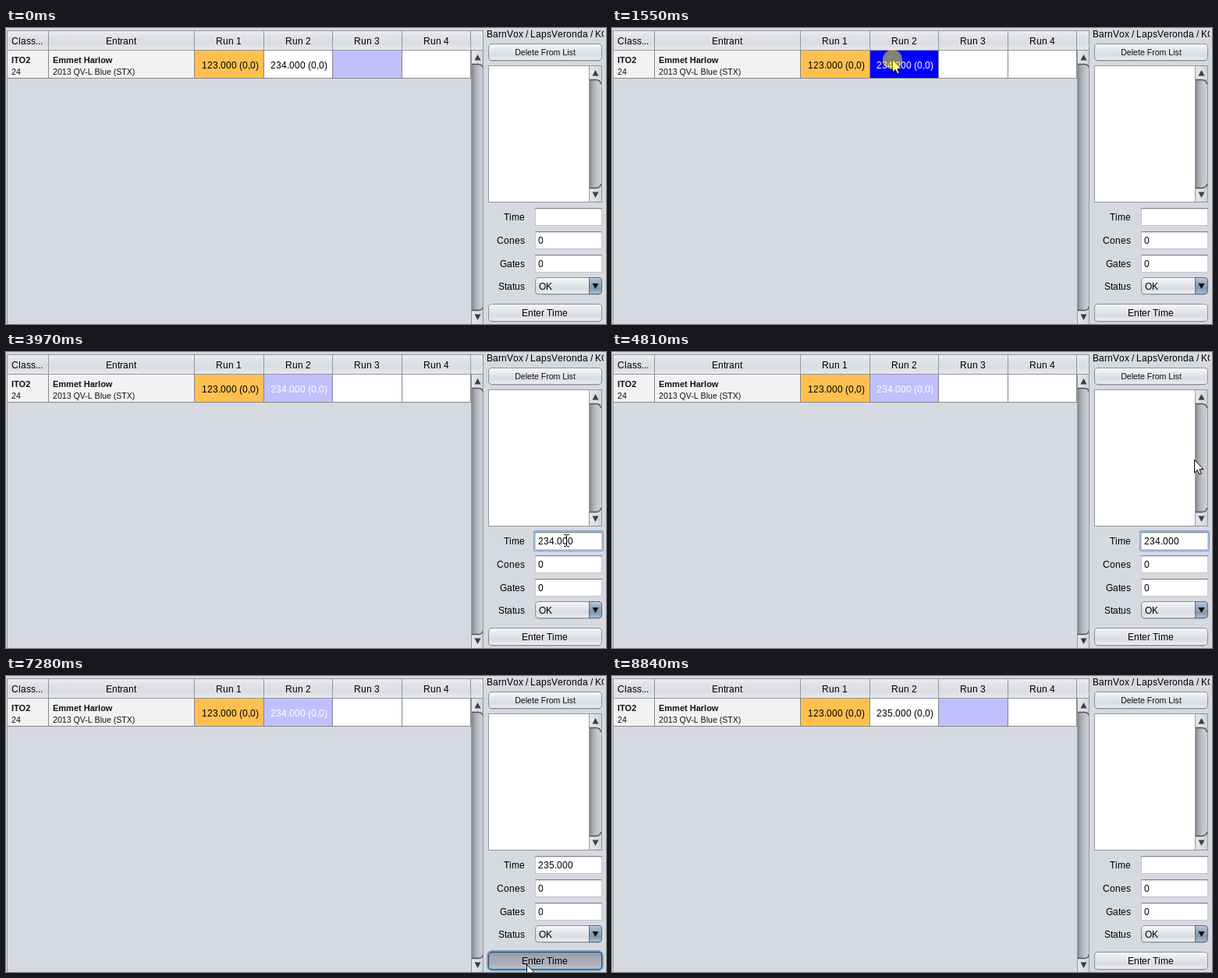
These frames come from a looping animation (769x380 px, 8.92 s). An HTML page with a canvas:

```html
<!DOCTYPE html>
<html lang="en">
<head>
<meta charset="utf-8">
<title>Editing a run time</title>
<style>
html, body { margin: 0; width: 100%; height: 100%; overflow: hidden; background: #d6d9df; }
canvas { display: block; }
</style>
</head>
<body>
<canvas id="stage" width="769" height="380"></canvas>
<script>
const ctx = document.getElementById('stage').getContext('2d');
const LOOP = 8920;
const FACE = '"Liberation Sans", Arial, sans-serif';
const BG = '#d6d9df', LINE = '#9297a1', GRID = '#85878c', RING = '#73a4d1', PALE = '#c0c0ff';

function box(x, y, w, h, fill) {
  ctx.fillStyle = fill;
  ctx.fillRect(x, y, w, h);
}

function shade(x0, y0, x1, y1, ...colors) {
  const g = ctx.createLinearGradient(x0, y0, x1, y1);
  colors.forEach((c, i) => g.addColorStop(i / (colors.length - 1), c));
  return g;
}

function round(x, y, w, h, r, fill) {
  ctx.fillStyle = fill;
  ctx.beginPath();
  ctx.roundRect(x, y, w, h, r);
  ctx.fill();
}

function poly(points, fill) {
  ctx.beginPath();
  points.forEach(([x, y]) => ctx.lineTo(x, y));
  ctx.closePath();
  ctx.fillStyle = fill;
  ctx.fill();
}

// Interface text whose glyphs advance by whole pixels.
function label(s, x, y, align = 0, color = '#000') {
  ctx.font = '12px ' + FACE;
  ctx.fillStyle = color;
  const widths = [...s].map(c => Math.round(ctx.measureText(c).width));
  x -= Math.round(widths.reduce((a, b) => a + b, 0) * align);
  [...s].forEach((c, i) => {
    ctx.fillText(c, x, y);
    x += widths[i];
  });
}

function small(s, x, y, font = '10.6px', align = 'left') {
  ctx.font = font + ' ' + FACE;
  ctx.fillStyle = '#111';
  ctx.textAlign = align;
  ctx.fillText(s, x, y);
  ctx.textAlign = 'left';
}

// Pointer travel: start, end, number of steps, from, to.
const moves = [
  [450, 1000, 8, 588, 294, 359, 40],
  [2100, 2590, 7, 359, 40, 709, 266],
  [2890, 2890, 1, 709, 266, 710, 266],
  [2970, 3200, 4, 710, 266, 739, 242],
  [3660, 3820, 3, 739, 242, 735, 242],
  [3970, 3970, 1, 735, 242, 718, 242],
  [4050, 4120, 2, 718, 242, 703, 238],
  [4350, 4350, 1, 703, 238, 700, 238],
  [4500, 4580, 2, 700, 238, 746, 138],
  [6590, 7210, 9, 746, 138, 667, 370],
  [8370, 8520, 3, 667, 370, 664, 400]
];

function pointer(t) {
  const m = moves.filter(v => v[0] <= t).pop();
  if (!m) return null;
  const [t0, t1, n, x0, y0, x1, y1] = m;
  const step = n > 1 ? Math.min(n - 1, Math.floor((t - t0) / (t1 - t0) * (n - 1) + 0.05)) : 0;
  const p = t0 === 450 ? step / (n - 1) : (step + 1) / n;
  const e = n > 3 ? p * p * (3 - 2 * p) : p;
  return { x: Math.round(x0 + (x1 - x0) * e), y: Math.round(y0 + (y1 - y0) * e) };
}

const within = (p, x, y, w, h) => p && p.x >= x && p.x < x + w && p.y >= y && p.y < y + h;
const during = (t, spans) => spans.some(([a, b]) => t >= a && t < b);

function drawPointer(p) {
  const { x, y } = p;
  if ([231, 261, 291].some(top => within(p, 678, top, 86, 23))) {
    for (const edge of [y - 8, y + 7]) {
      box(x - 3, edge, 3, 1, '#000');
      box(x + 1, edge, 3, 1, '#000');
    }
    box(x, y - 7, 1, 14, '#000');
    return;
  }
  const shape = [[0, 0], [0, 16.5], [3.8, 13], [6.3, 18.5], [8.8, 17.5], [6.4, 12], [11.5, 12]];
  poly(shape.map(([a, b]) => [x + a + 0.5, y + b + 0.5]), '#fff');
  ctx.lineWidth = 1;
  ctx.strokeStyle = '#000';
  ctx.stroke();
}

function clickMark(x, y) {
  ctx.fillStyle = 'rgba(255,255,0,.5)';
  ctx.beginPath();
  ctx.arc(x, y, 12.5, 0, 7);
  ctx.fill();
}

function scrollEnd(x, y, dir) {
  ctx.save();
  ctx.translate(x, y);
  ctx.scale(1, dir);
  ctx.beginPath();
  ctx.moveTo(0, 0);
  ctx.lineTo(15, 0);
  ctx.lineTo(15, 23);
  ctx.quadraticCurveTo(14, 17.5, 8, 17.5);
  ctx.lineTo(0, 17.5);
  ctx.closePath();
  ctx.fillStyle = shade(0, 0, 15, 0, '#e4e6ea', '#dde0e5', '#cfd2d8');
  ctx.fill();
  ctx.beginPath();
  ctx.moveTo(0, 17.5);
  ctx.lineTo(8, 17.5);
  ctx.quadraticCurveTo(14, 17.5, 14.5, 23);
  ctx.strokeStyle = '#4d5057';
  ctx.lineWidth = 1.3;
  ctx.stroke();
  poly([[3.5, 12.5], [7.5, 5], [11.5, 12.5]], '#3b3e44');
  ctx.restore();
}

function scrollBar(x, y, h) {
  box(x, y, 15, h, shade(x, 0, x + 15, 0, '#85888f', '#adb0b7', '#c3c6cc', '#cdd0d6'));
  scrollEnd(x, y, 1);
  scrollEnd(x, y + h, -1);
  box(x - 1, y, 1, h, LINE);
}

const looks = {
  normal: ['#8b8e96', '#fafbfc', '#e6e8ec', '#d9dce2', '#eff1f4'],
  hover: ['#7d8088', '#ffffff', '#f0f2f4', '#e5e8ec', '#fafbfc'],
  pressed: ['#39414d', '#8d94a2', '#a4aab6', '#a9afbb', '#c0c5ce']
};

function button(y, h, look, focus) {
  const [edge, ...fill] = looks[look];
  if (focus) round(616, y - 2, 150, h + 4, 7, RING);
  else round(618, y + 1, 146, h, 6, '#b9bcc3');
  round(618, y, 146, h, 5, edge);
  round(619, y + 1, 144, h - 2, 4, shade(0, y, 0, y + h, ...fill));
}

function field(y, focus) {
  if (focus) {
    round(676, y - 2, 90, 27, 2, RING);
    box(677, y - 1, 88, 25, '#a6c4de');
  }
  box(678, y, 86, 23, '#c3c5ca');
  box(678, y, 86, 1, '#85878b');
  box(679, y + 1, 84, 21, '#fff');
  box(679, y + 1, 84, 1, '#dcdddf');
}

const columns = [[1, 54, 'Class...'], [55, 241, 'Entrant'], [242, 330, 'Run 1'],
  [331, 418, 'Run 2'], [419, 507, 'Run 3'], [508, 595, 'Run 4'], [596, 611, '']];

function table(t) {
  const editing = t >= 1320 && t < 7360;
  const run2 = !editing ? '#fff' : t < 1700 ? '#0000ff' : PALE;
  const fills = ['#f2f2f2', '#f2f2f2', '#ffc04f', run2, editing ? '#fff' : PALE, '#fff'];
  box(1, 3, 611, 26, LINE);
  columns.forEach(([a, b, name], i) => {
    box(a + (i === 0), 4, b - a - (i === 0), 24, shade(0, 4, 0, 28, '#eceef1', '#dfe1e6', '#dadde2', '#e6e8ec'));
    if (i === 0) label(name, 7, 21);
    else label(name, Math.round((a + b) / 2), 21, 0.5);
    if (i < 6) {
      box(a, 29, b - a, 35, fills[i]);
      box(b, 29, 1, 36, GRID);
    }
  });
  box(1, 64, 595, 1, GRID);
  box(1, 3, 1, 377, LINE);
  small('ITO2', 7, 45, 'bold 11px');
  small('24', 7, 60);
  small('Emmet Harlow', 60, 45, 'bold 11px');
  small('2013 QV-L Blue (STX)', 60, 60);
  label('123.000 (0,0)', 251, 52);
  label((t < 7360 ? '234' : '235') + '.000 (0,0)', 339, 52, 0, editing ? '#fff' : '#000');
  scrollBar(597, 29, 351);
  box(611, 3, 1, 377, LINE);
}

function timeField(t) {
  const focus = t >= 1700 && t < 7280;
  const selected = t >= 1700 && t < 3350;
  const value = t < 1700 || t >= 7360 ? '' : t < 5590 ? '234.000' : t < 5670 ? '23.000' : '235.000';
  field(231, focus);
  if (selected) box(682, 234, 45, 16, '#39698a');
  label(value, 682, 247, 0, selected ? '#fff' : '#000');
  const blink = [[1700, 2180], [2740, 3200], [3350, 3970], [4350, 4810], [5360, 6130], [6640, 7130]];
  if (during(t, blink)) {
    const x = t < 4350 ? 727 : t >= 5590 && t < 5670 ? 696 : 703;
    box(x, 234, 1, 16, '#000');
  }
}

function panel(t, p) {
  ctx.save();
  ctx.beginPath();
  ctx.rect(612, 0, 154, 20);
  ctx.clip();
  label('BarnVox / LapsVeronda / KO', 616, 12);
  ctx.restore();

  button(20, 22, 'normal', false);
  small('Delete From List', 691, 35, '10.6px', 'center');

  box(618, 48, 146, 176, LINE);
  box(619, 49, 129, 174, '#fff');
  scrollBar(748, 49, 174);

  ['Time', 'Cones', 'Gates', 'Status'].forEach((s, i) => label(s, 665, [247, 277, 307, 336][i], 1));
  field(261, false);
  field(291, false);
  label('0', 682, 277);
  label('0', 682, 307);
  timeField(t);

  round(678, 321, 86, 22, 5, '#b9bcc3');
  round(678, 320, 86, 22, 5, '#8b8e96');
  round(679, 321, 84, 20, 4, shade(0, 320, 0, 342, ...looks.normal.slice(1)));
  round(747, 320, 17, 22, [0, 5, 5, 0], '#566e87');
  round(748, 321, 15, 20, [0, 4, 4, 0], shade(0, 320, 0, 342, '#c3d0dd', '#92a9c0', '#8199b1', '#b0c4d6'));
  poly([[751.5, 328], [759.5, 328], [755.5, 335]], '#111');
  label('OK', 683, 336);

  const over = within(p, 618, 354, 146, 23);
  const look = t >= 7280 && t < 7360 ? 'pressed' : over ? 'hover' : 'normal';
  button(354, 23, look, t >= 7280 && t < 8840);
  label('Enter Time', 691, 370, 0.5);
}

function draw(t) {
  const p = pointer(t);
  box(0, 0, 769, 380, BG);
  table(t);
  panel(t, p);
  if (p) drawPointer(p);
  if (during(t, [[1320, 1470], [1550, 1700]])) clickMark(359.5, 40.5);
  if (during(t, [[3350, 3430]])) clickMark(738.5, 241.5);
  if (during(t, [[4350, 4430]])) clickMark(700.5, 237.5);
}

const start = performance.now();
function tick() {
  draw((performance.now() - start) % LOOP);
  requestAnimationFrame(tick);
}
tick();
</script>
</body>
</html>
```
